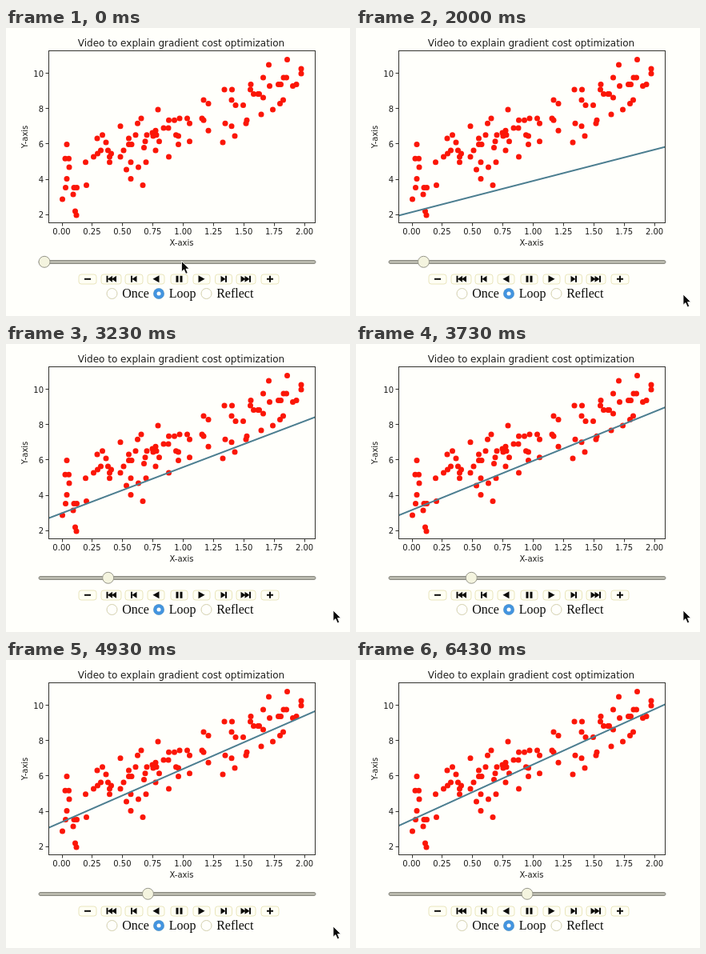
These frames come from a looping animation (430 by 360 pixels, 6460 ms). An HTML page:

```html
<!DOCTYPE html>
<html lang="en">
<head>
<meta charset="utf-8">
<title>Gradient cost optimization</title>
<style>
  html, body { margin: 0; width: 430px; height: 360px; overflow: hidden; background: #fffffb; }
  svg { display: block; }
  .plot { font: 10px "DejaVu Sans", sans-serif; fill: #1c1c1a; }
  .title { font-size: 12px; }
  .axis { fill: none; stroke: #33332f; stroke-width: 1; }
  .button { fill: #fffff4; stroke: #e9e5bd; }
  .radio { fill: #fffffb; stroke: #d3d0ae; }
  .choice { font: 16px "Liberation Serif", "Times New Roman", serif; fill: #0c0c0a; }
</style>
</head>
<body>
<svg width="430" height="360" viewBox="0 0 430 360">
  <defs><clipPath id="area"><rect x="53.5" y="28.5" width="333" height="215"/></clipPath></defs>
  <g id="plot" class="plot"></g>
  <g id="dots" fill="#fb1607"></g>
  <line id="fit" x1="53" x2="387" stroke="#4c7e90" stroke-width="2" clip-path="url(#area)"/>
  <rect class="axis" x="53.5" y="28.5" width="333" height="215"/>
  <rect x="41" y="290.5" width="346" height="4" rx="2" fill="#b9b9ae" stroke="#85857c"/>
  <circle id="knob" cy="292.3" r="7" fill="#f4f4df" stroke="#96968a"/>
  <g id="controls"></g>
  <path id="cursor" d="M0 0V13.2L3 10.5L5.3 15.8L7.7 14.8L5.5 9.6H9.6Z" fill="#0a0a0a" stroke="#fffffb" stroke-width=".8"/>
</svg>
<script>
const LOOP = 6460;
const $ = id => document.getElementById(id);

function add(parent, tag, attrs, text) {
  const node = document.createElementNS("http://www.w3.org/2000/svg", tag);
  for (const key in attrs) node.setAttribute(key, attrs[key]);
  if (text) node.textContent = text;
  return parent.appendChild(node);
}

// Axes
const plot = $("plot");
function label(x, y, text, anchor = "middle", extra = {}) {
  add(plot, "text", { x, y, "text-anchor": anchor, ...extra }, text);
}
label(219, 22.5, "Video to explain gradient cost optimization", "middle", { class: "title" });
label(219.5, 272, "X-axis");
label(0, 0, "Y-axis", "middle", { transform: "translate(27 136) rotate(-90)" });
for (let i = 0; i <= 8; i++) {
  const x = 69.5 + i * 37.94;
  add(plot, "path", { class: "axis", d: `M${Math.round(x) + .5} 243.5v4` });
  label(x, 258, (i / 4).toFixed(2));
}
for (let v = 2; v <= 10; v += 2) {
  const y = 277.7 - v * 22.12;
  add(plot, "path", { class: "axis", d: `M53.5 ${Math.floor(y) + .5}h-4` });
  label(47, y + 4, String(v), "end");
}

// Scatter, one row per height: y, then every x
const rows = [
  [39.5, 351.5], [46, 328.5], [51, 369], [57, 369], [62, 321.5, 347, 350.5],
  [70.5, 306, 340.5, 343.5, 363], [72.5, 329.5, 358.5], [77, 273, 282.5, 305.5],
  [82.5, 309.5, 315, 316.5], [87, 321.5], [90, 247, 282, 346.5], [94.5, 253, 342.5],
  [96.5, 287, 296.5], [102, 190, 333.5], [108, 319], [113, 169, 217, 226.5, 245],
  [115.3, 203.5, 210.5, 247, 301], [119.2, 164.5, 229.5, 274, 300], [122.7, 143, 282],
  [125, 197, 203], [128.2, 187, 253], [131, 183], [133.7, 120.5, 162, 176, 188, 212.5],
  [135, 184, 215.5, 286], [138, 114, 153.5], [141.7, 174, 191.5, 229.5], [143, 125, 271],
  [145.5, 76, 153.5, 157, 215.5], [149.5, 172.5], [153, 118.5, 127.5, 147, 187],
  [157, 114.5, 131.5], [161, 109.5, 129.5, 143, 203.5], [163.3, 74, 78.5],
  [167.7, 99.5, 129.5, 156, 175], [174, 79, 165.5], [177, 150.5], [188.5, 76, 156],
  [196.5, 100.5, 171], [199.5, 74.5, 85, 88.5], [208, 84], [214, 70.5], [229, 86.5], [234, 88]
];
for (const [cy, ...xs] of rows)
  for (const cx of xs) add($("dots"), "circle", { cx, cy, r: 3.5 });

// Player buttons; icons are drawn around their own centre
const controls = $("controls");
const left = x => `M${x} 0l6 -4v8z`, right = x => `M${x} 0l-6 -4v8z`;
const bar = x => `M${x} -4h2v8h-2z`;
const minus = "M-4 -1h8v2h-8z";
const buttons = [
  [102, 22, minus],
  [131.5, 25, bar(-6) + left(-4.5) + left(.5)],
  [160, 22, bar(-4) + left(-2.5)],
  [187.5, 21, "M-4 0l8 -4.5v9z"],
  [216.5, 21, "M-4 -4h3v8h-3zM1 -4h3v8h-3z"],
  [244.5, 21, "M4 0l-8 -4.5v9z"],
  [272, 21, bar(2) + right(2.5)],
  [300, 24, bar(4) + right(-.5) + right(4.5)],
  [330, 22, minus + "M-1 -4h2v8h-2z"]
];
for (const [x, width, d] of buttons) {
  add(controls, "rect", { class: "button", x: x - width / 2, y: 308, width, height: 12, rx: 3 });
  add(controls, "path", { d, transform: `translate(${x} 313.8)`, fill: "#0c0c0a" });
}

for (const [x, name] of [[132.5, "Once"], [191, "Loop"], [250.5, "Reflect"]]) {
  add(controls, "circle", { class: "radio", cx: x, cy: 332, r: 6.5 });
  add(controls, "text", { class: "choice", x: x + 12.7, y: 337 }, name);
}
add(controls, "circle", { cx: 191, cy: 332, r: 6.8, fill: "#4394df" });
add(controls, "circle", { cx: 191, cy: 332, r: 2.5, fill: "#fffffb" });

// Motion: time in ms, then values
const playback = [[0, 0], [560, 0], [1030, 5.3], [1330, 7.8], [2000, 11.4], [2700, 18.5],
  [3230, 24.4], [4270, 34.4], [5630, 45.4], [LOOP, 50.5]];
const pointer = [[0, 219.5, 291.5], [150, 219.5, 291.5], [620, 246, 311], [1030, 250, 312],
  [1350, 252, 313], [1900, 409, 333], [LOOP, 409, 333]];
const POINTER_GONE = 5050;

function at(track, t) {
  const i = Math.max(1, track.findIndex(p => p[0] >= t));
  const [a, b] = [track[i - 1], track[i]];
  const u = (t - a[0]) / (b[0] - a[0]);
  return a.slice(1).map((v, n) => v + (b[n + 1] - v) * u);
}

function draw(t) {
  const step = Math.floor(at(playback, t)[0]);
  const error = Math.exp(-step / 15.66);
  $("fit").setAttribute("y1", 204.9 + 59.8 * error);
  $("fit").setAttribute("y2", 46.7 + 205.5 * error);
  $("knob").setAttribute("cx", 48 + step * 3.32);
  const [x, y] = at(pointer, t);
  $("cursor").setAttribute("transform", `translate(${x} ${y})`);
  $("cursor").setAttribute("visibility", t < POINTER_GONE ? "visible" : "hidden");
}

const start = performance.now();
function tick() {
  draw((performance.now() - start) % LOOP);
  requestAnimationFrame(tick);
}
tick();
</script>
</body>
</html>
```
